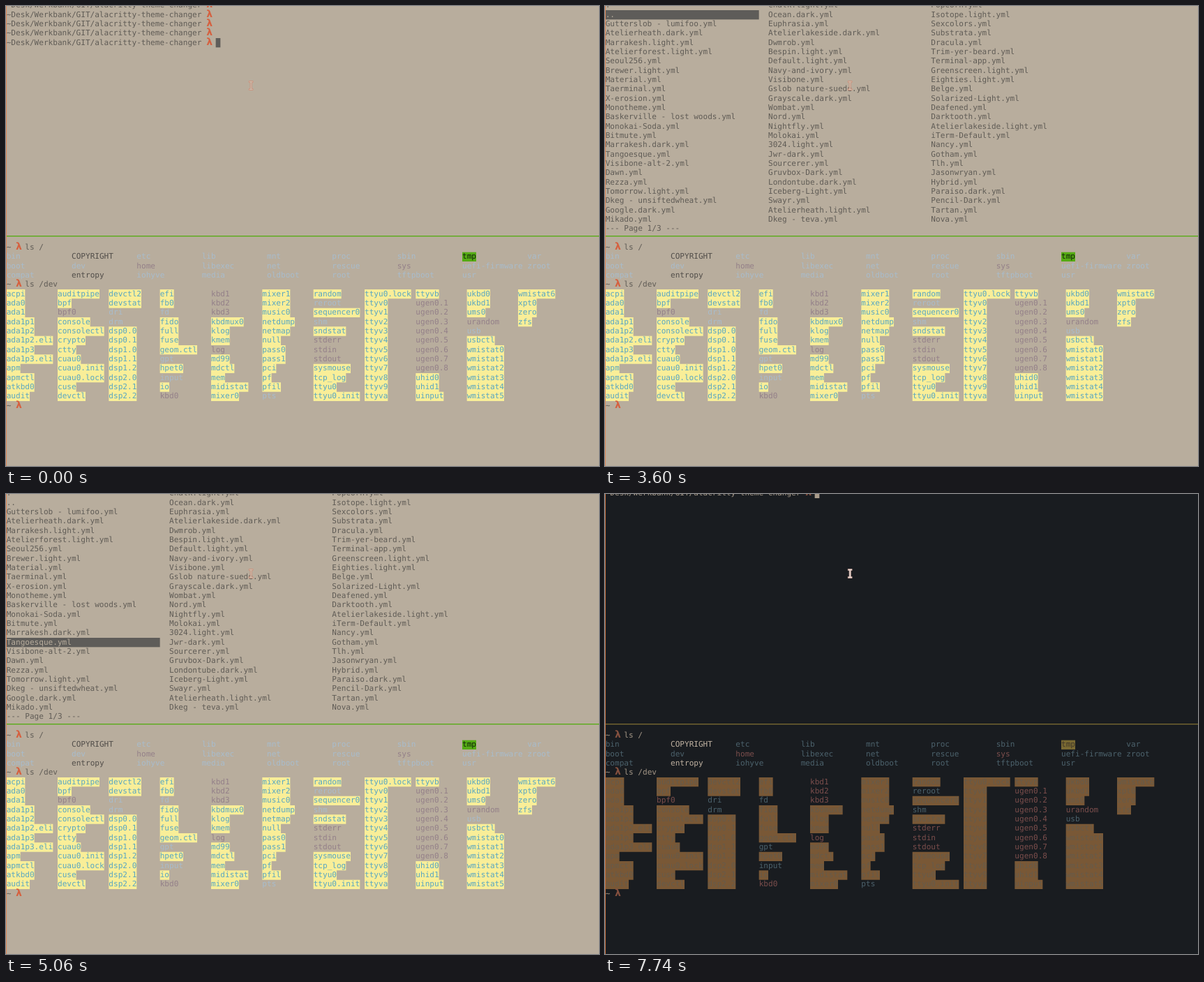
An HTML page for the animation above (8000 ms loop, 850 by 659 pixels).

```html
<!DOCTYPE html>
<html lang="en">
<head>
<meta charset="utf-8">
<title>Terminal theme switcher</title>
<style>
  html, body { margin: 0; width: 100%; height: 100%; overflow: hidden; }
  svg {
    --bg: #b8ad9d; --fg: #605c56; --plain: #524e4a; --block: #5e5c59; --lambda: #d5603f;
    --dir: #a8bccc; --link: #948089; --dev: #58a6c2; --devbg: #f9ee98;
    --tmp: #10200a; --green: #55ab14; --edge: #df8a5c; --beam: #c9bcac; --beamline: #d08a74;
    display: block; width: 850px; height: 659px; background: var(--bg);
  }
  svg.dark {
    --bg: #191c20; --fg: #a39686; --plain: #bfb1a0; --block: #a99b8a; --lambda: #85503f;
    --dir: #4c626c; --link: #7b4e4c; --dev: #665b4b; --devbg: #795836;
    --tmp: #40382a; --green: #7a6a32; --edge: #c56c3c; --beam: #eadcd4; --beamline: #d0a8a0;
  }
  text {
    font: 11.074px "DejaVu Sans Mono", monospace;
    text-rendering: geometricPrecision; white-space: pre; fill: var(--fg);
  }
  rect { fill: var(--block); }
  .lambda { font: bold 14px "DejaVu Sans", sans-serif; fill: var(--lambda); }
  .plain { fill: var(--plain); }
  .dir { fill: var(--dir); }
  .link { fill: var(--link); }
  .dev { fill: var(--dev); }
  .devbg { fill: var(--devbg); }
  .tmp { fill: var(--tmp); }
  .green { fill: var(--green); }
  .edge { fill: var(--edge); }
  .picked { fill: var(--bg); }
  .beam { fill: var(--beam); stroke: var(--beamline); stroke-width: .7; }
</style>
</head>
<body>
<svg id="stage" viewBox="0 0 850 659"></svg>
<script>
const CELL = 20 / 3, LINE = 40 / 3, LOOP = 8000;
const stage = document.getElementById('stage');
const colX = col => 2 / 3 + col * CELL;
const rowY = row => 6 + row * LINE;

function add(parent, tag, attrs = {}, content = '') {
  const node = document.createElementNS('http://www.w3.org/2000/svg', tag);
  for (const key in attrs) node.setAttribute(key, attrs[key]);
  node.textContent = content;
  return parent.appendChild(node);
}
const write = (parent, col, row, content, cls = '') =>
  add(parent, 'text', { x: colX(col), y: rowY(row) + 9.5, class: cls }, content);
const box = (parent, col, row, cells, cls = '') =>
  add(parent, 'rect', { x: colX(col), y: rowY(row), width: cells * CELL, height: LINE, class: cls });
const place = (rect, col, row) => {
  rect.setAttribute('x', colX(col));
  rect.setAttribute('y', rowY(row));
};
const show = (node, visible) => node.setAttribute('visibility', visible ? 'visible' : 'hidden');

function prompt(parent, row, path, command = '') {
  write(parent, 0, row, path);
  write(parent, path.length + 1, row, 'λ', 'lambda');
  return write(parent, path.length + 3, row, command);
}

const series = (stem, from, to) =>
  Array.from({ length: to - from + 1 }, (_, i) => stem + (from + i)).join(' ');

const rootRows = [
  '/bin =COPYRIGHT /etc /lib /mnt /proc /sbin !tmp /var',
  '/boot /dev @home /libexec /net /rescue @sys /uefi-firmware /zroot',
  '/compat =entropy /iohyve /media /oldboot /root /tftpboot /usr'
];
const devColumns = [
  'acpi ada0 ada1 ada1p1 ada1p2 ada1p2.eli ada1p3 ada1p3.eli apm apmctl atkbd0 audit',
  'auditpipe bpf @bpf0 console consolectl crypto ctty cuau0 cuau0.init cuau0.lock cuse devctl',
  'devctl2 devstat /dri /drm dsp0.0 dsp0.1 dsp1.0 dsp1.1 dsp1.2 dsp2.0 dsp2.1 dsp2.2',
  'efi fb0 /fd fido full fuse geom.ctl /gpt hpet0 /input io @kbd0',
  '@kbd1 @kbd2 @kbd3 kbdmux0 klog kmem @log md99 mdctl mem midistat mixer0',
  'mixer1 mixer2 music0 netdump netmap null pass0 pass1 pci pf pfil /pts',
  'random /reroot sequencer0 /shm sndstat @stderr @stdin @stdout sysmouse tcp_log ttyu0 ttyu0.init',
  `ttyu0.lock ${series('ttyv', 0, 9)} ttyva`,
  `ttyvb ${series('@ugen0.', 1, 8)} uhid0 uhid1 uinput`,
  `ukbd0 ukbd1 ums0 @urandom /usb usbctl ${series('wmistat', 0, 5)}`,
  'wmistat6 xpt0 zero zfs'
];
const themeColumns = [
  '.|..|Gutterslob - lumifoo|Atelierheath.dark|Marrakesh.light|Atelierforest.light|Seoul256|Brewer.light|Material|Taerminal|X-erosion|Monotheme|Baskerville - lost woods|Monokai-Soda|Bitmute|Marrakesh.dark|Tangoesque|Visibone-alt-2|Dawn|Rezza|Tomorrow.light|Dkeg - unsiftedwheat|Google.dark|Mikado',
  'Chalk.light|Ocean.dark|Euphrasia|Atelierlakeside.dark|Dwmrob|Bespin.light|Default.light|Navy-and-ivory|Visibone|Gslob nature-suede|Grayscale.dark|Wombat|Nord|Nightfly|Molokai|3024.light|Jwr-dark|Sourcerer|Gruvbox-Dark|Londontube.dark|Iceberg-Light|Swayr|Atelierheath.light|Dkeg - teva',
  'Popcorn|Isotope.light|Sexcolors|Substrata|Dracula|Trim-yer-beard|Terminal-app|Greenscreen.light|Eighties.light|Belge|Solarized-Light|Deafened|Darktooth|Atelierlakeside.light|iTerm-Default|Nancy|Gotham|Tlh|Jasonwryan|Hybrid|Paraiso.dark|Pencil-Dark|Tartan|Nova'
];

// Lower pane; device cells share one path so that stacked rows join without seams
const lower = add(stage, 'g');
const deviceCells = add(lower, 'path', { class: 'devbg' });
let cellPath = '';

// Prefixes: / directory, @ link, ! sticky directory, = plain file; none is a device
const KINDS = { '/': 'dir', '@': 'link', '!': 'tmp', '=': 'plain' };
function entry(col, row, item) {
  const kind = KINDS[item[0]] || 'dev';
  const name = kind === 'dev' ? item : item.slice(1);
  const width = name.length * CELL;
  if (kind === 'dev') cellPath += `M${colX(col)} ${rowY(row)}h${width}v${LINE}h${-width}z`;
  if (kind === 'tmp') box(lower, col, row, name.length, 'green');
  write(lower, col, row, name, kind);
}

prompt(lower, 25, '~', 'ls /');
rootRows.forEach((line, r) =>
  line.split(' ').forEach((item, c) => entry(c * 14, 26 + r, item)));
prompt(lower, 29, '~', 'ls /dev');
devColumns.forEach((line, c) =>
  line.split(' ').forEach((item, r) => entry(c * 11, 30 + r, item)));
prompt(lower, 42, '~');
deviceCells.setAttribute('d', cellPath);

// Upper pane: shell history, theme list, cleared shell
const path = '~Desk/Werkbank/GIT/alacritty-theme-changer';
const shell = add(stage, 'g');
for (let row = -1; row < 3; row++) prompt(shell, row, path);
const command = prompt(shell, 3, path);

const list = add(stage, 'g');
const bar = box(list, 0, 0, 33);
const choices = [];
themeColumns.forEach((column, c) => column.split('|').forEach((name, r) => {
  const label = write(list, c * 35, r - 1, /^\.+$/.test(name) ? name : name + '.yml');
  if (c === 0) choices.push(label);
}));
write(list, 0, 23, '--- Page 1/3 ---');

const cleared = add(stage, 'g');
prompt(cleared, -1, path);

const cursor = box(stage, 45, 3, 1);
add(stage, 'rect', { x: 0, y: 329, width: 850, height: 4 / 3, class: 'green' });
add(stage, 'rect', { x: 0, y: 0, width: 1, height: 659, class: 'edge' });
add(stage, 'path', {
  d: 'M348.3 107.5h5.8v2h-1.8v9h1.8v2h-5.8v-2h1.8v-9h-1.8z', class: 'beam'
});

// Each step: time, then the values that change
const steps = [
  [0, { screen: shell, typed: '', cursor: [45, 3], dark: false }],
  [1360, { typed: './', cursor: [47, 3] }],
  [1760, { typed: './crittheme', cursor: [56, 3] }],
  [2640, { cursor: [0, 4] }],
  [2740, { screen: list, cursor: null, pick: -1 }],
  [3600, { pick: 0 }],
  [4300, { pick: 1 }],
  [4400, { pick: 3 }],
  [4480, { pick: 5 }],
  [4560, { pick: 8 }],
  [4640, { pick: 10 }],
  [4720, { pick: 13 }],
  [4980, { pick: 14 }],
  [5060, { pick: 15 }],
  [5280, { pick: 16 }],
  [5440, { pick: 17 }],
  [5940, { screen: cleared, cursor: [45, -1] }],
  [7740, { dark: true }]
];

function render(state) {
  for (const screen of [shell, list, cleared]) show(screen, screen === state.screen);
  command.textContent = state.typed;
  show(cursor, state.cursor);
  if (state.cursor) place(cursor, ...state.cursor);
  if (state.screen === list) {
    place(bar, 0, state.pick);
    choices.forEach((label, i) => label.classList.toggle('picked', i - 1 === state.pick));
  }
  stage.classList.toggle('dark', state.dark);
}

const start = performance.now();
let shown = 0;
function tick() {
  const time = Math.max(0, performance.now() - start) % LOOP;
  const count = steps.filter(([at]) => at <= time).length;
  if (count !== shown) {
    shown = count;
    render(Object.assign({}, ...steps.slice(0, count).map(step => step[1])));
  }
  requestAnimationFrame(tick);
}
tick();
</script>
</body>
</html>
```
